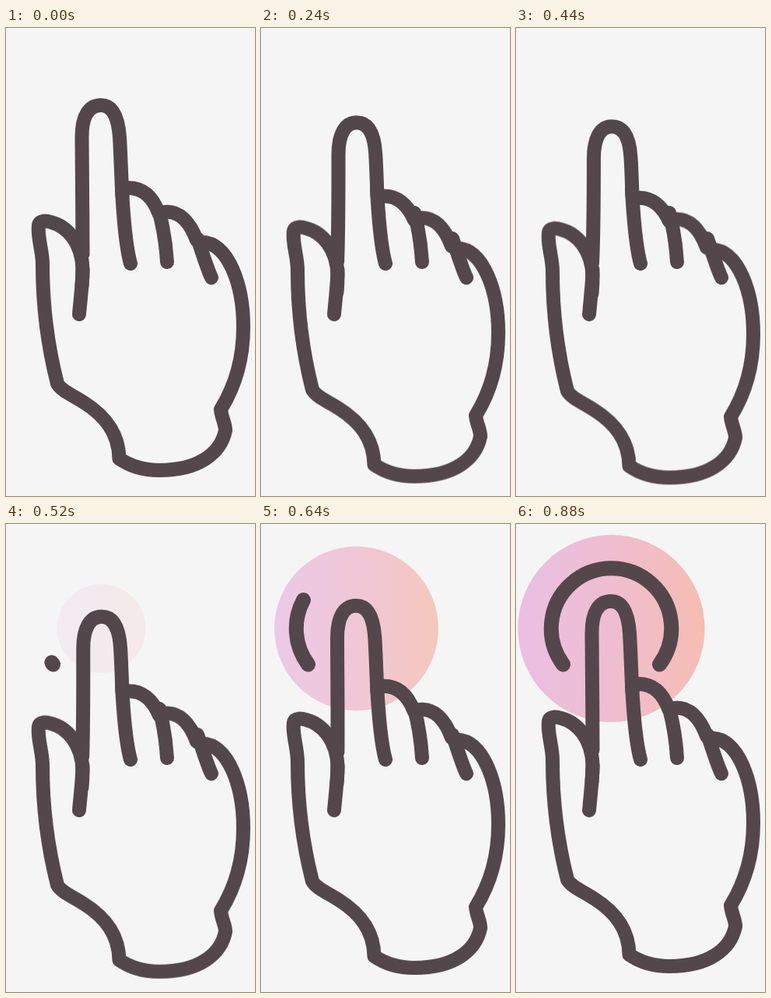
Write an HTML page that moves like this. It is 320 by 600 pixels and loops after 1.6 s.

```html
<!DOCTYPE html>
<html lang="en">
<head>
<meta charset="utf-8">
<title>Tap gesture</title>
<style>
  html, body { margin: 0; width: 100%; height: 100%; overflow: hidden; background: #f5f5f5; }
  svg { display: block; width: 100vw; height: 100vh; }
  .line { fill: none; stroke: #54474b; stroke-width: 18; stroke-linecap: round; stroke-linejoin: round; }
  #arc { stroke-width: 19; }
</style>
</head>
<body>
<svg viewBox="0 0 320 600">
  <defs>
    <linearGradient id="glow">
      <stop offset="0" stop-color="#eabfe3"/>
      <stop offset=".5" stop-color="#efbdd0"/>
      <stop offset="1" stop-color="#f6bdb2"/>
    </linearGradient>
  </defs>
  <circle id="disc" cx="122.5" cy="134" r="120" fill="url(#glow)" opacity="0"/>
  <path id="arc" class="line" pathLength="100" d="M60.5 180A77.2 77.2 0 1 1 184.5 180"/>
  <g class="line">
    <!-- creases that stay in place -->
    <path d="M98.5 310C98.5 325 95.5 350 94 367"/>
    <path d="M149 207C150.5 235 153 277 160 302"/>
    <path d="M197 237C201 252 205.5 275 207 300"/>
    <path d="M246 270C253 290 258 307 264 320"/>
    <!-- outline that dips with the press -->
    <g id="palm">
      <path d="M204 236C222 234 236 248 245 272"/>
      <path d="M252 274.5C286 276 305 330 305 383C305 425 294 460 276 489
               C277 500 282 507 282 516C276 545 248 567 197 567C176 567 160 562 145.5 552
               C145 519 127 497 100 480C86 471 71 465 66 456
               C55 413 47 360 47 303C47 285 40 268 42 253C43 246 52 247 58 249
               C78 254 98 275 98.5 310C98.5 318 98 325 97.5 331"/>
    </g>
    <path id="finger"/>
    <path id="knuckle"/>
  </g>
</svg>
<script>
const LOOP = 1600, STEP = 40;
const DOWN = 'cubic-bezier(.7,0,.3,1)';
const UP = 'cubic-bezier(.38,0,.2,1)';
const CUBIC = 'cubic-bezier(.65,0,.35,1)';

const anims = [];

// steps: [time in ms, styles, easing towards the next step]
function track(id, steps) {
  const frames = steps.map(([ms, style, easing = 'linear']) =>
    ({ ...style, offset: ms / LOOP, easing }));
  const anim = document.getElementById(id).animate(frames, { duration: LOOP, iterations: Infinity });
  anim.pause();
  anims.push(anim);
}

function press(id, rest, pressed) {
  track(id, [[0, rest, DOWN], [390, pressed, UP], [880, rest], [LOOP, rest]]);
}

const shape = d => ({ d: `path("${d}")` });
const shift = y => ({ transform: `translate(0px, ${y}px)` });

press('palm', shift(0), shift(9.7));
press('finger',
  shape('M98.5 290C98.5 240 97.5 180 97.5 140C97.5 112 107 99 122 99C137 99 144 113 146 140C147.3 160 148 190 149.5 215'),
  shape('M98 302C100 260 100 215 100 168C100 143 108 127 123 127C138 127 146 141 147.5 167C148.5 182 149 200 149.5 215'));
press('knuckle',
  shape('M155 205C176 204 189 217 196.5 238'),
  shape('M154 218.5C174 216 188 229 197 248'));

const small = { r: '43px', opacity: 0 }, full = { r: '120px', opacity: 1 };
track('disc', [[0, small], [432, small, 'ease-in-out'], [730, full], [LOOP, full]]);

const sweep = (len, opacity = 1) => ({ strokeDasharray: `${len} 200`, opacity });
track('arc', [[0, sweep(0, 0)], [480, sweep(0, 0)], [480, sweep(0), CUBIC], [878, sweep(100)], [LOOP, sweep(100)]]);

const start = performance.now();
function draw() {
  const t = (performance.now() - start) % LOOP;
  const held = Math.floor((t + 1) / STEP) * STEP % LOOP;
  for (const anim of anims) anim.currentTime = held;
  requestAnimationFrame(draw);
}
draw();
</script>
</body>
</html>
```
